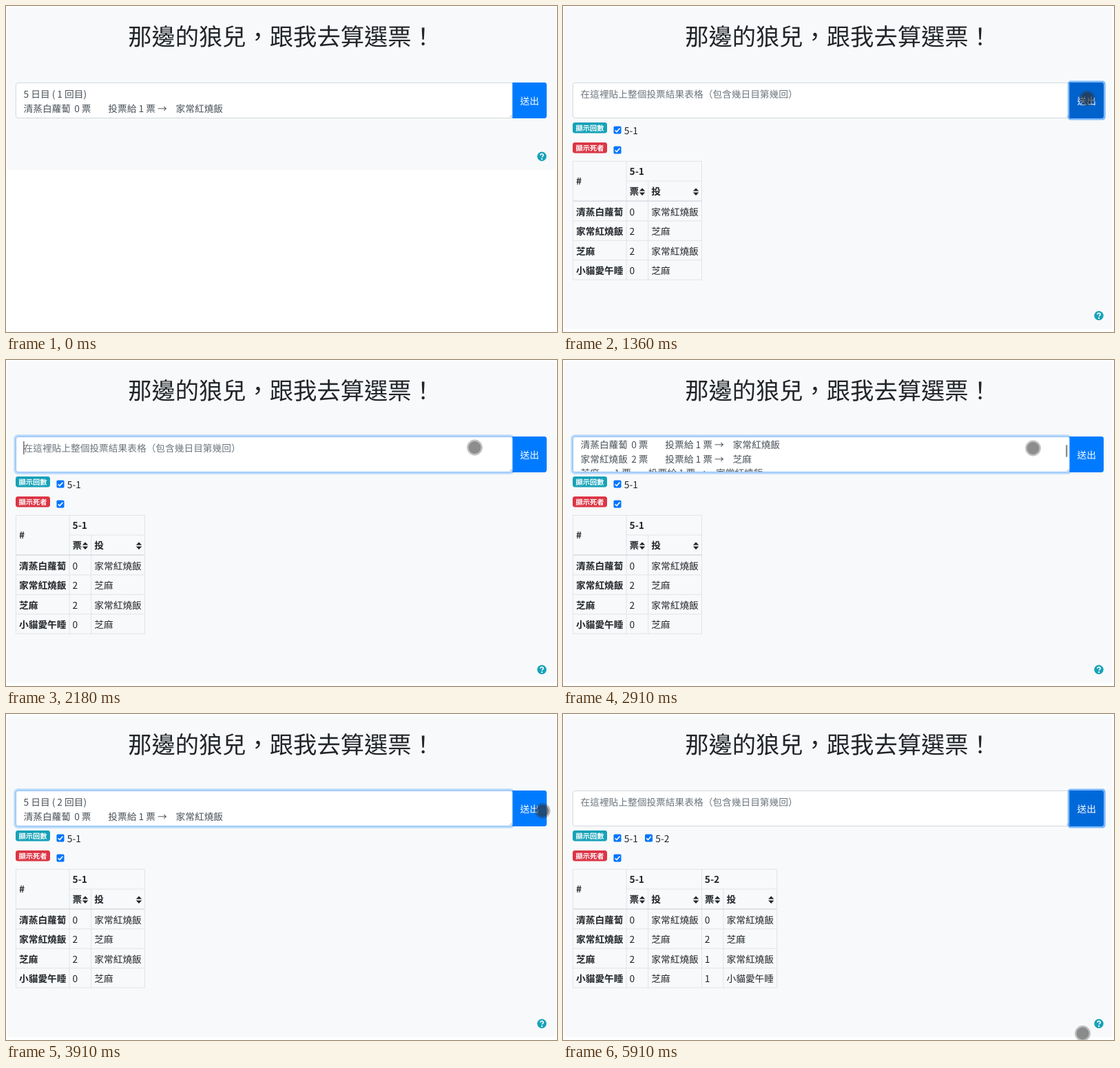
Recreate the animation shown at these times as an HTML page. Size 800x473 px, loop 6 s.

```html
<!DOCTYPE html>
<html lang="zh-Hant">
<head>
<meta charset="utf-8">
<title>算選票</title>
<style>
  html, body { margin: 0; width: 100%; height: 100%; overflow: hidden; background: #fff; }
  svg { display: block; }
  text { font: 13.714px "Noto Sans CJK TC", "Noto Sans CJK", sans-serif; white-space: pre; text-rendering: geometricPrecision; }
  .title { font-size: 34.286px; font-weight: 500; }
  .bold { font-weight: 700; }
  .badge { font-size: 10.286px; font-weight: 700; }
</style>
</head>
<body>
<svg id="stage" width="800" height="473" viewBox="0 0 800 473">
  <defs>
    <clipPath id="inputClip"><rect x="15" y="111.8" width="720" height="50.6"/></clipPath>
  </defs>
  <g id="scene"></g>
</svg>
<script>
const LOOP = 6000;
const INK = '#212529', MUTED = '#495057', LINE = '#dee2e6', TEAL = '#17a2b8';
const LINE_HEIGHT = 20.571, TAB = 24.56, TEXT_X = 25.5;

const names = ['清蒸白蘿蔔', '家常紅燒飯', '芝麻', '小貓愛午睡'];
const rounds = [
  { label: '5-1', number: 1, votes: [0, 2, 2, 0], targets: [1, 2, 1, 2] },
  { label: '5-2', number: 2, votes: [0, 2, 1, 1], targets: [1, 2, 1, 3] }
];

// Held tracks: each entry is [start time, ...values].
const cursorTrack = [
  [0], [640, 782, 137], [730, 768, 135], [820, 761, 134],
  [1450, 758, 134], [1540, 735, 131], [1640, 705, 128], [1730, 689, 127],
  [1820, 684, 127], [1910, 680.5, 127], [2910, 682.5, 128],
  [3360, 692, 129], [3450, 725, 133], [3540, 763, 138], [3640, 779, 140.5],
  [4450], [5910, 754.5, 463.5]
];
const scrollTrack = [[0, 0], [2450, 62], [2910, 25.6], [3000, 5], [3090, 0]];
const scrollbarTrack = [[0, 0], [2450, .8], [2730, 1], [3360, .6], [3450, .3], [3540, 0]];
const buttonTrack = [
  [0, '#007bff', 0], [1180, '#0062cc', .5], [1270, '#0062cc', 1], [1450, '#0069d9', 1],
  [2090, '#0072ec', .5], [2180, '#007bff', 0],
  [4270, '#0062cc', .5], [4360, '#0062cc', 1], [4450, '#0069d9', 1]
];
const focusTrack = [[0, 0], [2090, .5], [2180, 1], [4270, .5], [4360, 0]];

const at = (track, t) => track.filter(key => key[0] <= t).pop().slice(1);
const between = (t, from, to) => t >= from && t < to;

const text = (x, y, str, fill = INK, cls = '', anchor = 'start') =>
  `<text x="${x}" y="${y}" fill="${fill}" class="${cls}" text-anchor="${anchor}">${str}</text>`;
const rect = (x, y, w, h, fill, rx = 0, extra = '') =>
  `<rect x="${x}" y="${y}" width="${w}" height="${h}" rx="${rx}" fill="${fill}" ${extra}/>`;
const path = (d, stroke, width = 1, fill = 'none') =>
  `<path d="${d}" stroke="${stroke}" stroke-width="${width}" fill="${fill}"/>`;

function voteText(round, scroll) {
  const y = line => 133.2 + line * LINE_HEIGHT - scroll;
  let out = text(TEXT_X, y(0), `5 日目 ( ${round.number} 回目)`, MUTED);
  names.forEach((name, i) => {
    const stop = name.length > 2 ? 3 : 2;
    const cell = (tabs, str) => text(TEXT_X + TAB * tabs, y(i + 1), str, MUTED);
    out += cell(0, name) + cell(stop, `${round.votes[i]} 票`) +
      cell(stop + 2, '投票給 1 票 →') + cell(stop + 6, names[round.targets[i]]);
  });
  return out;
}

function inputBox(t) {
  const [scroll] = at(scrollTrack, t);
  const [bar] = at(scrollbarTrack, t);
  const round = t < 1270 ? rounds[0] : between(t, 2450, 4360) ? rounds[1] : null;
  let inner = round ? voteText(round, scroll)
    : text(TEXT_X, 133.2, '在這裡貼上整個投票結果表格（包含幾日目第幾回）', '#6c757d');
  if (between(t, 2090, 2450)) inner += rect(25.4, 118, 1, 19, INK);
  if (between(t, 2450, 2910)) inner += rect(315.2, 138.5, 1, 19, INK);
  if (bar) inner += rect(730, 115 + scroll / 62 * 20, 2.4, 17.5, '#8d8d8d', 1, `opacity="${bar}"`);
  return path('M736 111.4H17.8a3.4 3.4 0 0 0-3.4 3.4V159.2a3.4 3.4 0 0 0 3.4 3.4H736Z', '#ced4da', .9, '#fff') +
    `<g clip-path="url(#inputClip)">${inner}</g>` +
    path('M731.5 161.2l3-3M733.6 161.4l1-1', '#777', .7);
}

function button(t) {
  const [fill, ring] = at(buttonTrack, t);
  const shape = 'M735.3 111H781.6a3.4 3.4 0 0 1 3.4 3.4V159.6a3.4 3.4 0 0 1-3.4 3.4H735.3Z';
  return (ring ? rect(732.7, 108.4, 55, 57.2, '#007bff', 4.5, `opacity="${ring / 2}"`) : '') +
    path(shape, 'none', 0, fill) + text(760.3, 142.6, '送出', '#fff', '', 'middle');
}

function inputFocus(t) {
  const [level] = at(focusTrack, t);
  if (!level) return '';
  return `<g opacity="${level}">` +
    rect(12.7, 109.7, 724.3, 54.6, 'none', 4, 'stroke="#007bff" stroke-opacity=".25" stroke-width="2.7"') +
    rect(14.4, 111.4, 720.9, 51.2, 'none', 3, 'stroke="#80bdff" stroke-width=".9"') + '</g>';
}

const checkbox = (x, y) => rect(x - 5.5, y - 5.5, 11, 11, '#0075ff', 1.8) +
  path(`M${x - 3.3} ${y + .2}l2.3 2.4 4.4-5.1`, '#fff', 1.6);

const badge = (y, label, fill) => rect(14, y, 50, 15.5, fill, 3.4) +
  text(39, y + 11.6, label, '#fff', 'badge', 'middle');

const sortIcon = x =>
  path(`M${x - 4.2} 268.6l4.2-4.4 4.2 4.4ZM${x - 4.2} 270.6l4.2 4.4 4.2-4.4Z`, 'none', 0, INK);

function results(count) {
  const rowY = i => 303.5 + i * 28.5;
  const right = 201.5 + (count - 1) * 109.2;
  let grid = `M14.5 225.3H${right}M92 254H${right}`;
  for (let i = 1; i <= 4; i++) grid += `M14.5 ${283.4 + i * 28.45}H${right}`;
  grid += 'M14.5 225V397.5M92 225V397.5';
  let out = badge(169, '顯示回數', TEAL) + badge(198, '顯示死者', '#dc3545') + checkbox(79, 209);
  out += text(19, 259.3, '#', INK, 'bold');
  names.forEach((name, i) => out += text(19, rowY(i), name, INK, 'bold'));
  rounds.slice(0, count).forEach((round, n) => {
    const x = n * 109.2;
    grid += `M${123.7 + x} 254V397.5M${201.5 + x} 225V397.5`;
    out += checkbox(79 + n * 45.5, 180) + text(88.8 + n * 45.5, 185.8, round.label);
    out += text(96.6 + x, 245.3, round.label, INK, 'bold');
    out += text(96.6 + x, 274.4, '票', INK, 'bold') + sortIcon(115 + x);
    out += text(128.3 + x, 274.4, '投', INK, 'bold') + sortIcon(193 + x);
    names.forEach((_, i) => {
      out += text(96.6 + x, rowY(i), round.votes[i]) + text(128.3 + x, rowY(i), names[round.targets[i]]);
    });
  });
  return path(grid, LINE, .9) + path(`M14.5 283H${right}`, LINE, 1.8) + out;
}

const helpIcon = y => `<circle cx="778" cy="${y}" r="6.7" fill="${TEAL}"/>` +
  path(`M775.9 ${y - 1.7}c.2-2.8 4.4-2.6 4.3 0c0 1.5-2 1.5-2 3`, '#fff', 1.6) +
  `<circle cx="778.1" cy="${y + 3.6}" r="1.1" fill="#fff"/>`;

function touchPoint(t) {
  const [x, y] = at(cursorTrack, t);
  if (x === undefined) return '';
  const pressed = between(t, 1180, 1450) || between(t, 3910, 4450);
  const disc = (r, alpha) => `<circle cx="${x}" cy="${y}" r="${r}" fill="#323232" fill-opacity="${alpha}"/>`;
  return disc(11.4, .3) + disc(9, pressed ? .5 : .36);
}

function draw(t) {
  const count = t < 1270 ? 0 : t < 4360 ? 1 : 2;
  const bottom = count ? 469 : 238;
  return rect(1.7, 1.7, 796.3, bottom - 1.7, '#f8f9fa', 4) +
    text(400, 57, '那邊的狼兒，跟我去算選票！', INK, 'title', 'middle') +
    inputBox(t) + button(t) + inputFocus(t) +
    (count ? results(count) : '') + helpIcon(bottom - 19.7) + touchPoint(t);
}

const scene = document.getElementById('scene');
const start = performance.now();
let shown = '';
function tick() {
  const markup = draw((performance.now() - start) % LOOP);
  if (markup !== shown) scene.innerHTML = shown = markup;
  requestAnimationFrame(tick);
}
tick();
</script>
</body>
</html>
```
